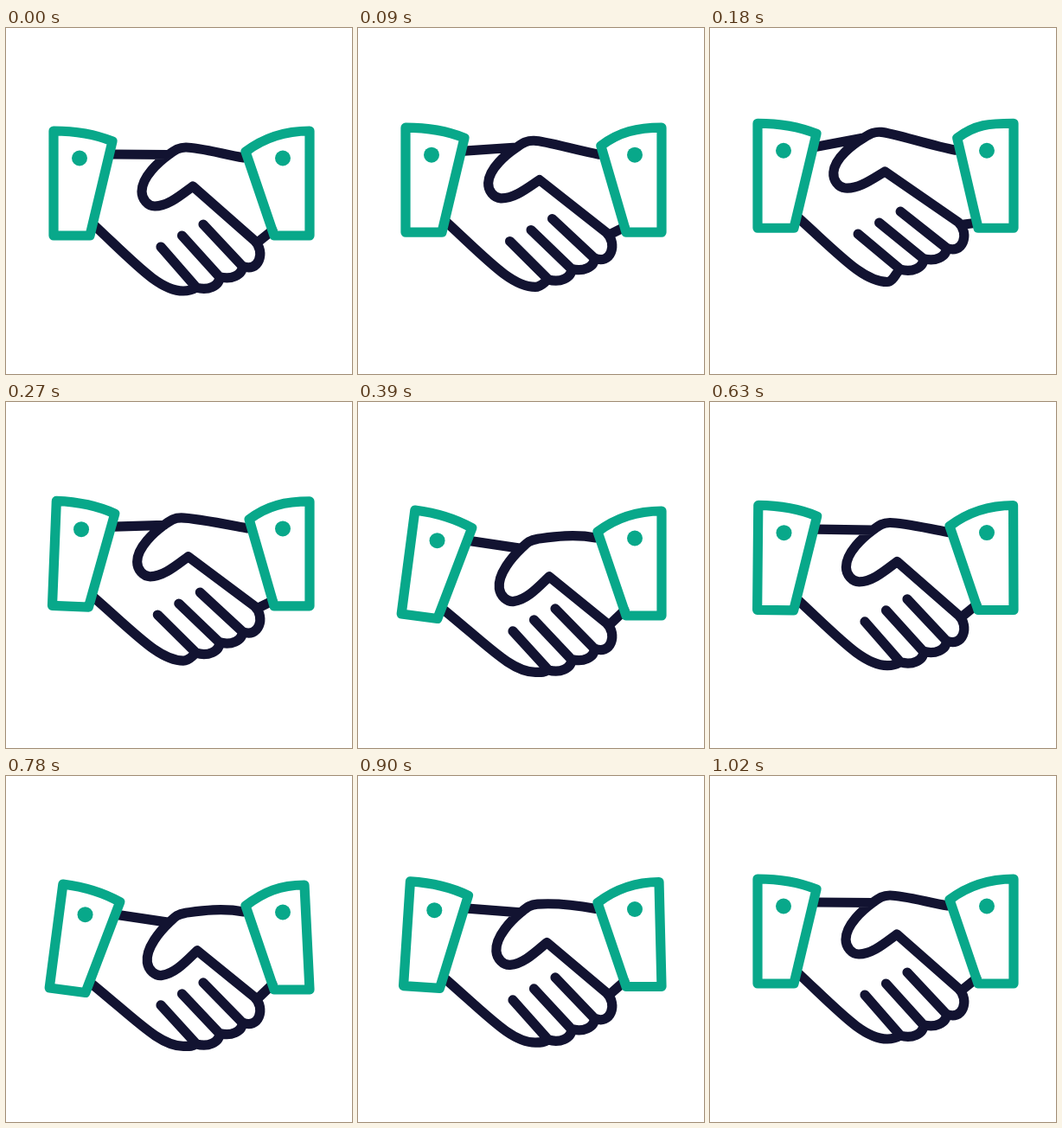
An HTML page with a canvas that plays this animation: 400 by 400 pixels, repeating every 1.55 s.

```html
<!DOCTYPE html>
<html lang="en">
<head>
<meta charset="utf-8">
<title>Handshake</title>
<style>
html, body { margin: 0; width: 100%; height: 100%; overflow: hidden; background: #fff; }
canvas { display: block; width: 100vmin; height: 100vmin; }
</style>
</head>
<body>
<canvas id="stage"></canvas>
<script>
const SIZE = 400, LOOP = 1550, STEP = 30, END = 1020;
const GREEN = '#08a88a', DARK = '#121331', WIDTH = 11.2;

// time, vertical shift, tilt of the left arm, lean of the right cuff's edge
const keys = [
  [0, 0, 0, 0],
  [200, -9, 0, 0],
  [390, 7, 0.13, 0],
  [600, 0, 0, 0],
  [780, 7, 0.13, 6],
  [END, 0, 0, 0]
];

const canvas = document.getElementById('stage');
const ctx = canvas.getContext('2d');
const ratio = window.devicePixelRatio || 1;
canvas.width = canvas.height = SIZE * ratio;

function motionAt(t) {
  const k = Math.max(1, keys.findIndex(key => key[0] >= t));
  const a = keys[k - 1], b = keys[k];
  const s = (t - a[0]) / (b[0] - a[0]);
  const ease = s * s * (3 - 2 * s);
  return a.map((v, i) => v + (b[i] - v) * ease).slice(1);
}

function turn(x, y, cx, cy, angle) {
  const c = Math.cos(angle), s = Math.sin(angle);
  return [cx + (x - cx) * c - (y - cy) * s, cy + (x - cx) * s + (y - cy) * c];
}

const off = (p, x, y) => [p[0] + x, p[1] + y];
const move = p => ctx.moveTo(...p);
const line = p => ctx.lineTo(...p);
const curve = (a, b, p) => ctx.bezierCurveTo(...a, ...b, ...p);

function segment(a, b) {
  move(a);
  line(b);
}

// Each part maps a resting point to its place in the current pose
function partsAt(t) {
  const [shift, tilt, lean] = motionAt(t);
  const pull = Math.min(shift, 0);
  const bend = tilt + pull * 0.01;
  return {
    arm: (x, y) => off(turn(x, y, 68, 202, tilt), 0, shift),
    thumb: (x, y) => off(turn(x, y, 310, 150, -bend), 1.3 * pull, shift),
    finger: (x, y) => [x, y + 1.4 * shift + pull],
    root: (x, y) => [x + 0.9 * pull, y + 1.7 * shift],
    palm: (x, y) => [x, y + 1.2 * shift],
    sleeve: (x, y) => [x, y + shift],
    inner: (x, y) => [x - pull, y + shift + 0.8 * pull],
    heel: (x, y) => [x - pull, y + shift],
    outer: (x, y) => [x - lean, y + shift]
  };
}

function drawHands({ arm, thumb, finger, root, palm, sleeve, heel }) {
  const knuckle = finger(287, 245.5);
  const ends = [];

  ctx.strokeStyle = DARK;
  ctx.beginPath();
  segment(arm(123, 146), thumb(188, 146.5));
  segment(off(knuckle, 3, 3), sleeve(308, 234));
  for (let i = 0; i < 3; i++) {
    ends.push(finger(273 - 26.5 * i, 275 + 12.5 * i));
    segment(root(228 - 24.5 * i, 227 + 13 * i), ends[i]);
  }

  // Back of the right hand and thumb
  move(heel(275, 150));
  curve(heel(248, 145), thumb(222, 138), thumb(208, 138));
  curve(thumb(199, 138), thumb(195, 141.5), thumb(188, 146.5));
  curve(thumb(177, 154.5), thumb(157, 172), thumb(157, 189));
  curve(thumb(157, 198), thumb(164, 206), thumb(172, 206));
  curve(thumb(187, 206), thumb(201, 194), thumb(216, 183));
  line(knuckle);

  // Fingertips and lower edge of the left hand
  curve(off(knuckle, 14, 13), off(ends[0], 19, 9), ends[0]);
  for (let i = 0; i < 2; i++)
    curve(off(ends[i], 1, 11), off(ends[i + 1], 13, 4), ends[i + 1]);
  curve(off(ends[2], -5, 3), palm(212, 304), palm(205, 304));
  curve(palm(178, 304), palm(152, 275), arm(103, 229));
  ctx.stroke();
}

function drawCuff(corner, c1, c2, rest, button) {
  ctx.strokeStyle = ctx.fillStyle = GREEN;
  ctx.beginPath();
  move(corner);
  curve(c1, c2, rest[0]);
  rest.slice(1).forEach(line);
  ctx.closePath();
  ctx.stroke();
  ctx.beginPath();
  ctx.arc(...button, 9, 0, Math.PI * 2);
  ctx.fill();
}

function draw(now) {
  const t = Math.min(END, Math.floor(now % LOOP / STEP) * STEP);
  const parts = partsAt(t);
  const { arm, sleeve, inner, outer, heel } = parts;
  ctx.setTransform(ratio, 0, 0, ratio, 0, 0);
  ctx.fillStyle = '#fff';
  ctx.fillRect(0, 0, SIZE, SIZE);
  ctx.lineWidth = WIDTH;
  ctx.lineCap = ctx.lineJoin = 'round';
  drawHands(parts);
  drawCuff(arm(55, 119), arm(79, 119), arm(101, 122),
    [arm(123, 131), arm(97, 240), arm(55, 240)], arm(85, 150.5));
  drawCuff(inner(277, 143), inner(298, 127), outer(323, 119),
    [outer(351, 119), sleeve(351, 240), sleeve(310, 240)], sleeve(320, 150.5));
}

let begin;
function tick(now) {
  begin ??= now;
  draw(now - begin);
  requestAnimationFrame(tick);
}
draw(0);
requestAnimationFrame(tick);
</script>
</body>
</html>
```
